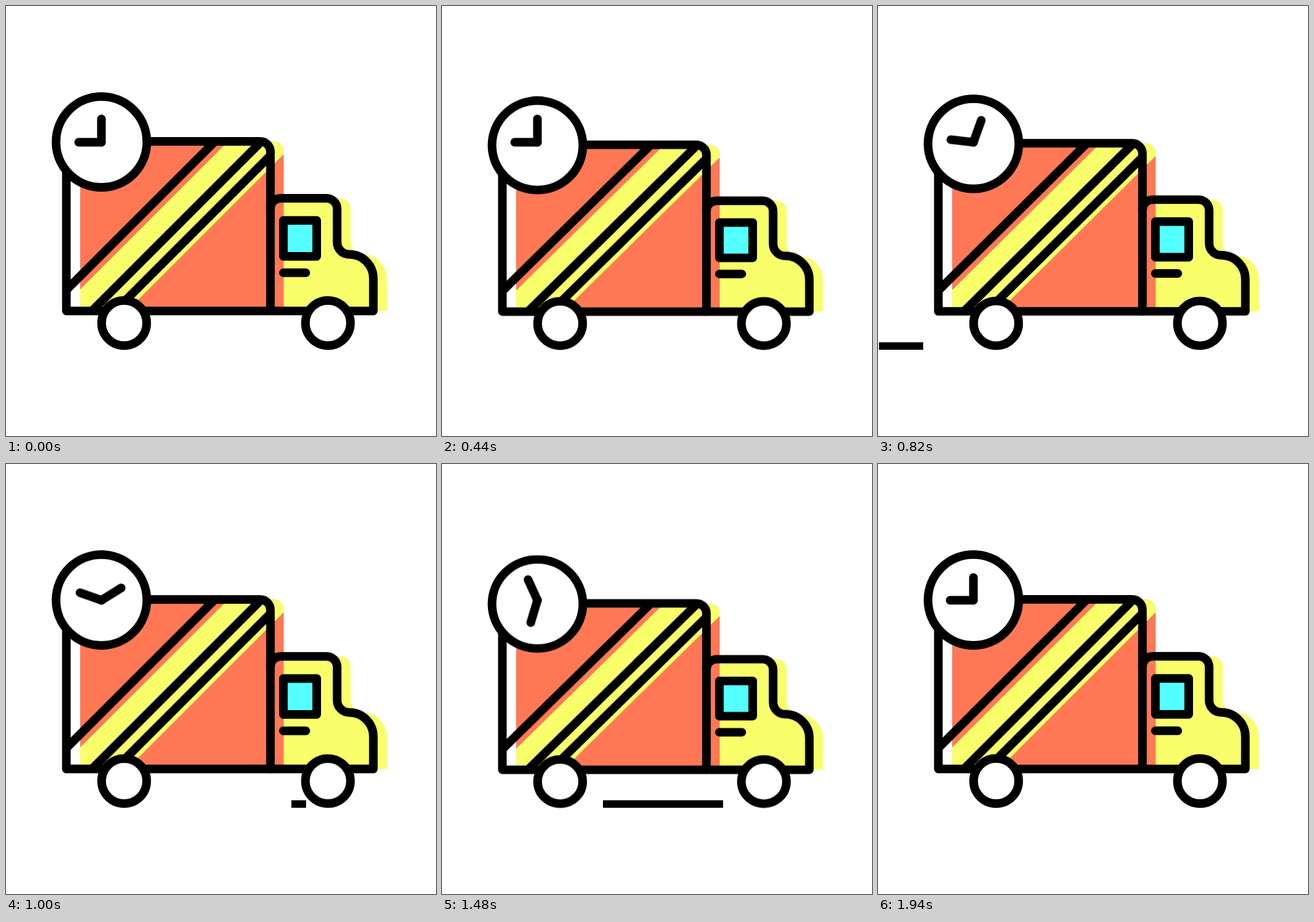
Write an HTML page that moves like this. It is 748x748 px and loops after 2440 ms.

```html
<!DOCTYPE html>
<html lang="en">
<head>
<meta charset="utf-8">
<title>Delivery truck</title>
<style>
  html, body { margin: 0; width: 100%; height: 100%; overflow: hidden; background: #fff; }
  svg { display: block; width: 100vw; height: 100vh; }

  .ink { fill: none; stroke: #000; stroke-width: 15; stroke-linecap: round; stroke-linejoin: round; }
  .white { fill: #fff; }
  .red { fill: #ff7855; }
  .yellow { fill: #f8ff6a; }
  .cyan { fill: #54ffff; }

  .truck, .hand, .road rect {
    animation: 2440ms cubic-bezier(.333, 0, .667, 1) infinite;
  }
  .truck { transform-origin: 0 598px; animation-name: squash; }
  .hand { transform-origin: 166px 237px; }
  .minute { animation-name: minute; }
  .hour { animation-name: hour; }

  /* each streak grows leftwards, then a white cover follows it */
  .road rect { transform-box: fill-box; transform-origin: 100% 50%; }
  .rear-in { animation-name: rear-in !important; }
  .rear-out { animation-name: rear-out !important; }
  .front-in { animation-name: front-in !important; }
  .front-out { animation-name: front-out !important; }

  /* percentages are ms / 24.4 */
  @keyframes squash {
    0%, 42.62%, 79.51%, 100% { transform: scaleY(1); }
    23.77%, 61.07% { transform: scaleY(.981); }
  }
  @keyframes minute {
    0%, 24.59% { transform: rotate(0deg); }
    79.51%, 100% { transform: rotate(270deg); }
  }
  @keyframes hour {
    0%, 24.59% { transform: rotate(0deg); }
    79.51%, 100% { transform: rotate(90deg); }
  }
  @keyframes rear-in {
    0%, 22.13% { transform: scaleX(0); }
    34.43%, 100% { transform: scaleX(1); }
  }
  @keyframes rear-out {
    0%, 27.87% { transform: scaleX(0); }
    40.16%, 100% { transform: scaleX(1); }
  }
  @keyframes front-in {
    0%, 36.07% { transform: scaleX(0); }
    60.66%, 100% { transform: scaleX(1); }
  }
  @keyframes front-out {
    0%, 54.92% { transform: scaleX(0); }
    79.51%, 100% { transform: scaleX(1); }
  }
</style>
</head>
<body>
<svg viewBox="0 0 748 748">
  <defs>
    <clipPath id="box">
      <path d="M129 235.5H465a18 18 0 0 1 18 18V530.5H129Z"/>
    </clipPath>
  </defs>

  <g class="road">
    <rect class="rear-in" x="0" y="585" width="144" height="13"/>
    <rect class="rear-out white" x="-1" y="584" width="146" height="15"/>
    <rect class="front-in" x="280" y="585" width="242" height="13"/>
    <rect class="front-out white" x="279" y="584" width="244" height="15"/>
  </g>

  <g class="truck">
    <g clip-path="url(#box)">
      <rect class="red" x="129" y="235" width="354" height="296"/>
      <path class="yellow" d="M92 530L392 230H511L211 530V531H92Z"/>
    </g>
    <path class="yellow" d="M483 530.5V352a18 17.5 0 0 1 18-17.5H581a18.5 18.5 0 0 1 18.5 18.5V411a21 21 0 0 0 21 21a42 42 0 0 1 42 42V530.5Z"/>

    <g class="ink">
      <path stroke-linecap="butt" d="M105 494L363.500 235.500M149.500 530.500L444.500 235.500M200 520L460 260"/>
      <path d="M105 290V530.500H639V474a42 42 0 0 0-42-42a21 21 0 0 1-21-21V353a18.500 18.500 0 0 0-18.500-18.500H478a18 17.500 0 0 0-18 17.500"/>
      <path d="M240 235.500H442a18 18 0 0 1 18 18V530.500"/>
      <rect class="cyan" x="482.500" y="373" width="58" height="62.500"/>
      <path d="M482.500 464H521.500"/>
      <circle class="white" cx="205.500" cy="551.500" r="39.200"/>
      <circle class="white" cx="560" cy="551.500" r="39.200"/>
      <circle class="white" cx="166" cy="236.500" r="79"/>
    </g>
  </g>

  <g class="ink">
    <path class="hand minute" d="M166 237V196.500"/>
    <path class="hand hour" d="M166 237H126.500"/>
  </g>
</svg>
</body>
</html>
```
